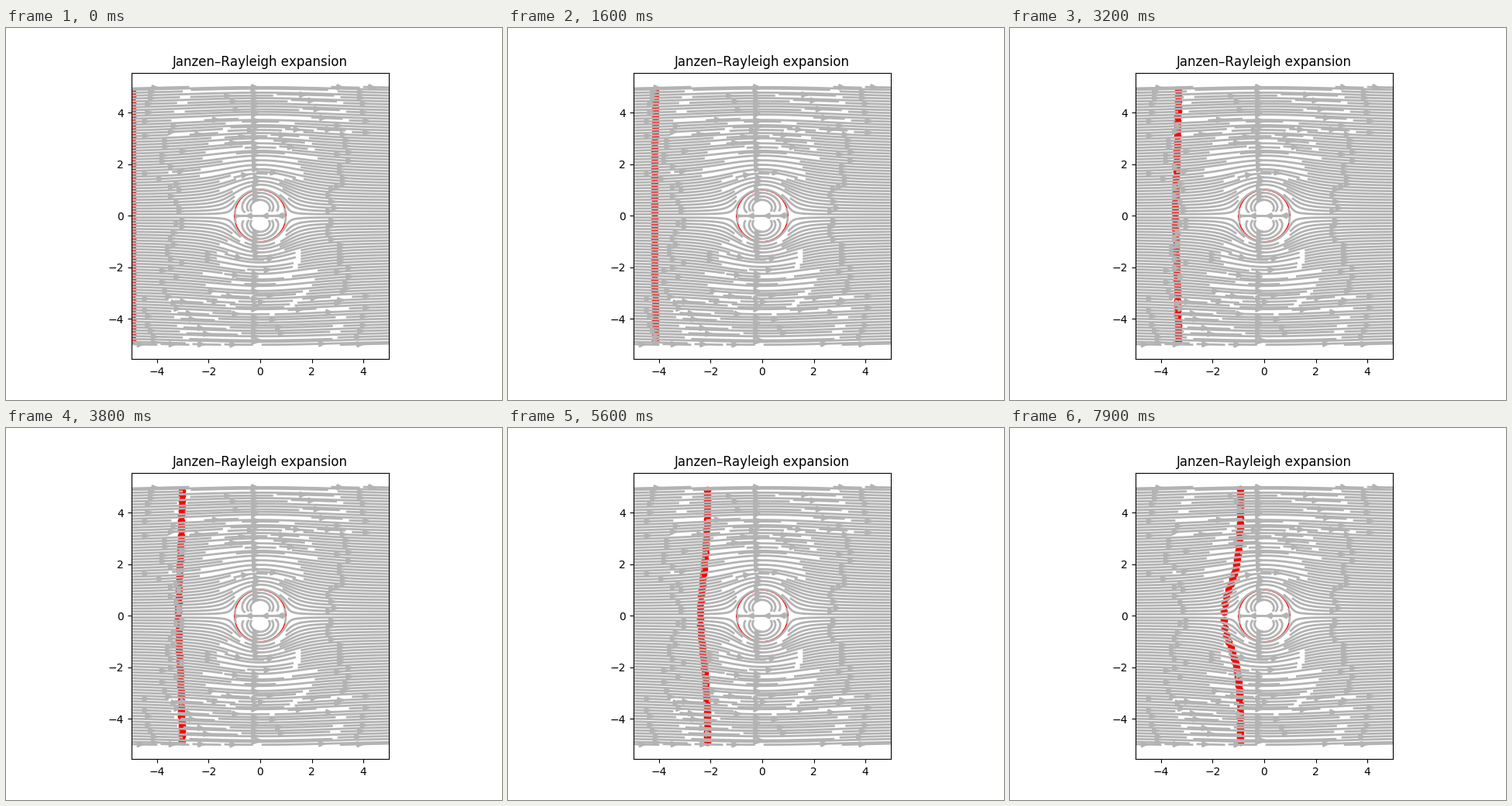
These frames come from a looping animation (640x480 px, 8000 ms). A matplotlib script:

```python
import numpy as np
import matplotlib.pyplot as plt
from matplotlib.animation import FuncAnimation

MACH = 0.2
DT = 0.05
FRAMES = 80

plt.rcParams["text.kerning_factor"] = 6


def velocity(x, y):
    """Flow past a unit cylinder, Janzen-Rayleigh expansion to order MACH**2."""
    r, th = np.hypot(x, y), np.arctan2(y, x)
    k = MACH**2 / 12
    c1, c3 = np.cos(th), np.cos(3 * th)
    s1, s3 = np.sin(th), np.sin(3 * th)
    ur = (1 - r**-2) * c1 + k * (
        (-13 * r**-2 + 18 * r**-4 - 5 * r**-6) * c1
        + 3 * (r**-2 - r**-4) * c3)
    ut = -(1 + r**-2) * s1 - k * (
        (13 * r**-2 - 6 * r**-4 + r**-6) * s1
        + 3 * (r**-4 - 3 * r**-2) * s3)
    return np.array([ur * c1 - ut * s1, ur * s1 + ut * c1])


def step(p):
    k1 = velocity(*p)
    k2 = velocity(*(p + DT / 2 * k1))
    k3 = velocity(*(p + DT / 2 * k2))
    k4 = velocity(*(p + DT * k3))
    return p + DT / 6 * (k1 + 2 * k2 + 2 * k3 + k4)


y0 = np.linspace(-4.8, 4.8, 50)
path = [np.array([np.full_like(y0, -5), y0])]
for _ in range(FRAMES):
    path.append(step(path[-1]))

fig, ax = plt.subplots(figsize=(6.4, 4.8), dpi=100)
ax.set_aspect("equal")
ax.set_title("Janzen–Rayleigh expansion")
dots, = ax.plot([], [], "ro")
ax.add_patch(plt.Circle((0, 0), 1, fill=False, color="r"))

grid = np.linspace(-5, 5, 100)
X, Y = np.meshgrid(grid, grid)
U, V = velocity(X, Y)
ax.streamplot(X, Y, U, V, density=3, linewidth=2, color="0.7")
ax.set(xlim=(-5, 5), ylim=(-5.555, 5.555))


def update(i):
    dots.set_data(*path[i + 1])
    return dots,


anim = FuncAnimation(fig, update, frames=FRAMES, interval=100,
                     repeat=True, repeat_delay=0)
plt.show()
```
